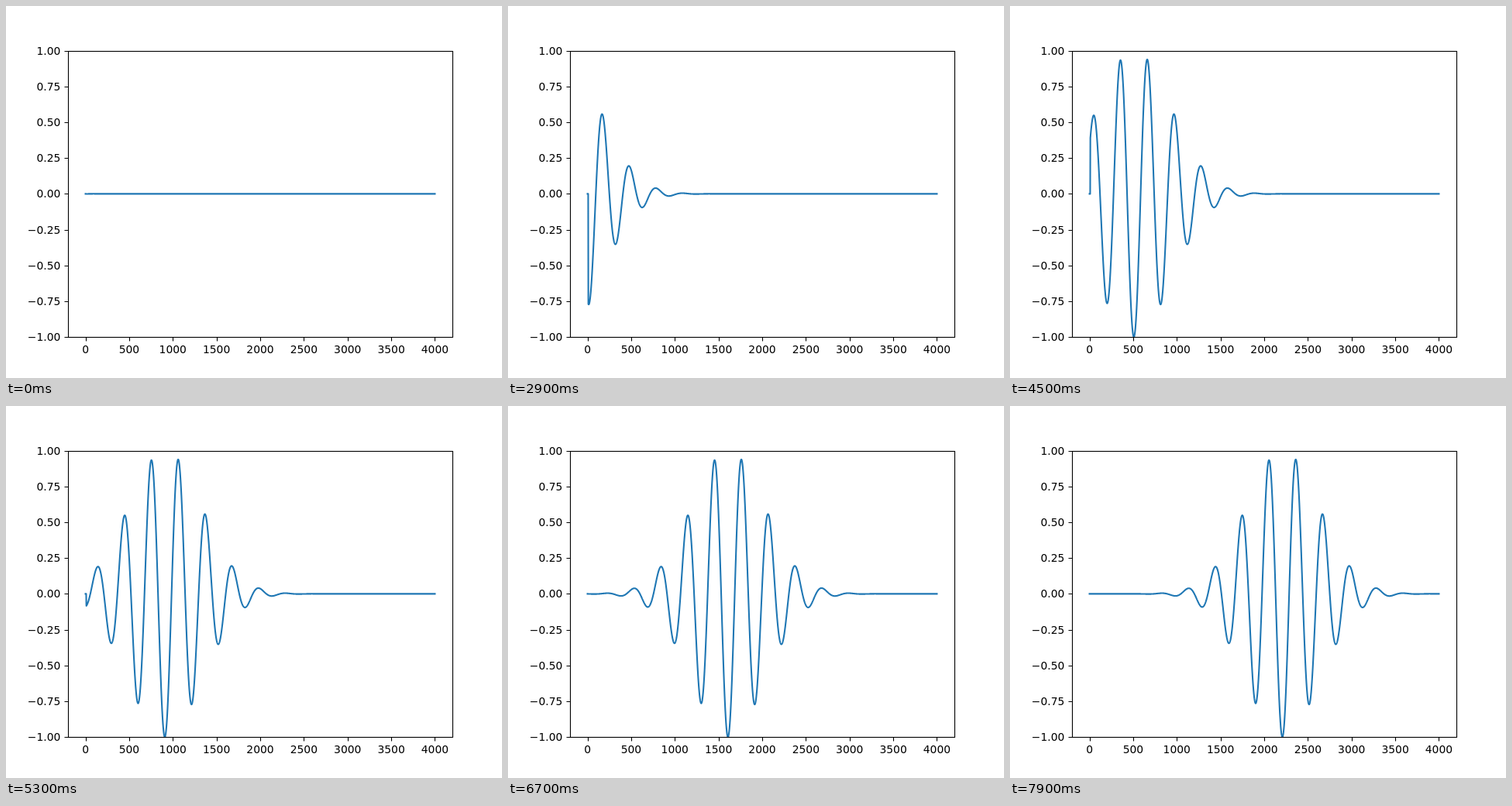
These frames come from a looping animation (640x480 px, 8000 ms). An HTML page:

```html
<!DOCTYPE html>
<html lang="en">
<head>
<meta charset="utf-8">
<title>Travelling wave packet</title>
<style>
  html, body { margin: 0; width: 100%; height: 100%; overflow: hidden; background: #fff; }
  svg { display: block; width: 640px; height: 480px; }
  text { font: 13.889px "DejaVu Sans", sans-serif; }
  .axes { fill: none; stroke: #000; stroke-width: 1.11; }
  #wave { fill: none; stroke: #1f77b4; stroke-width: 2.083; stroke-linejoin: round; stroke-linecap: square; }
</style>
</head>
<body>
<svg viewBox="0 0 640 480">
  <clipPath id="plot"><rect x="80" y="58" width="496" height="369"/></clipPath>
  <g clip-path="url(#plot)"><path id="wave"/></g>
  <path id="ticks" class="axes"/>
  <rect class="axes" x="80.5" y="58.5" width="496" height="369"/>
  <g id="labels"></g>
</svg>
<script>
const LOOP = 8000, FIRST_STEP = 500, STEP_MS = 200;
const CELLS = 4000, EMITTER = 10, SHIFT = 100, START = -1492;
const PERIOD = 310, WIDTH = 600, ENVELOPE_OFFSET = 3;

const byId = id => document.getElementById(id);
const px = x => 102.545 + x * 450.909 / CELLS;
const py = y => 242.4 - y * 184.8;
const snap = v => Math.floor(v + 0.5) + 0.5;

function addLabel(content, x, y, anchor) {
  const label = document.createElementNS("http://www.w3.org/2000/svg", "text");
  label.setAttribute("x", x);
  label.setAttribute("y", y);
  label.setAttribute("text-anchor", anchor);
  label.textContent = content;
  byId("labels").append(label);
}

function drawAxes() {
  let ticks = "";
  for (let x = 0; x <= CELLS; x += 500) {
    ticks += `M${snap(px(x))} 427.5v5`;
    addLabel(x, px(x), 448, "middle");
  }
  for (let y = -1; y <= 1; y += 0.25) {
    ticks += `M80.5 ${snap(py(y))}h-5`;
    addLabel(y.toFixed(2).replace("-", "\u2212"), 70.3, Math.round(py(y) + 5), "end");
  }
  byId("ticks").setAttribute("d", ticks);
}

// Cells left of the emitter stay at rest.
function amplitude(x, center) {
  if (x < EMITTER) return 0;
  const d = x - center;
  return -Math.cos(2 * Math.PI * d / PERIOD) * Math.exp(-(((d - ENVELOPE_OFFSET) / WIDTH) ** 2));
}

let shownStep = null;
function draw(now) {
  const step = Math.max(-1, Math.floor((now % LOOP - FIRST_STEP) / STEP_MS));
  if (step !== shownStep) {
    shownStep = step;
    const center = START + SHIFT * step;
    const points = [];
    for (let x = 0; x <= CELLS; x += 2) {
      points.push(px(x).toFixed(2) + " " + py(amplitude(x, center)).toFixed(2));
    }
    byId("wave").setAttribute("d", "M" + points.join("L"));
  }
  requestAnimationFrame(() => draw(performance.now()));
}

drawAxes();
draw(performance.now());
</script>
</body>
</html>
```
